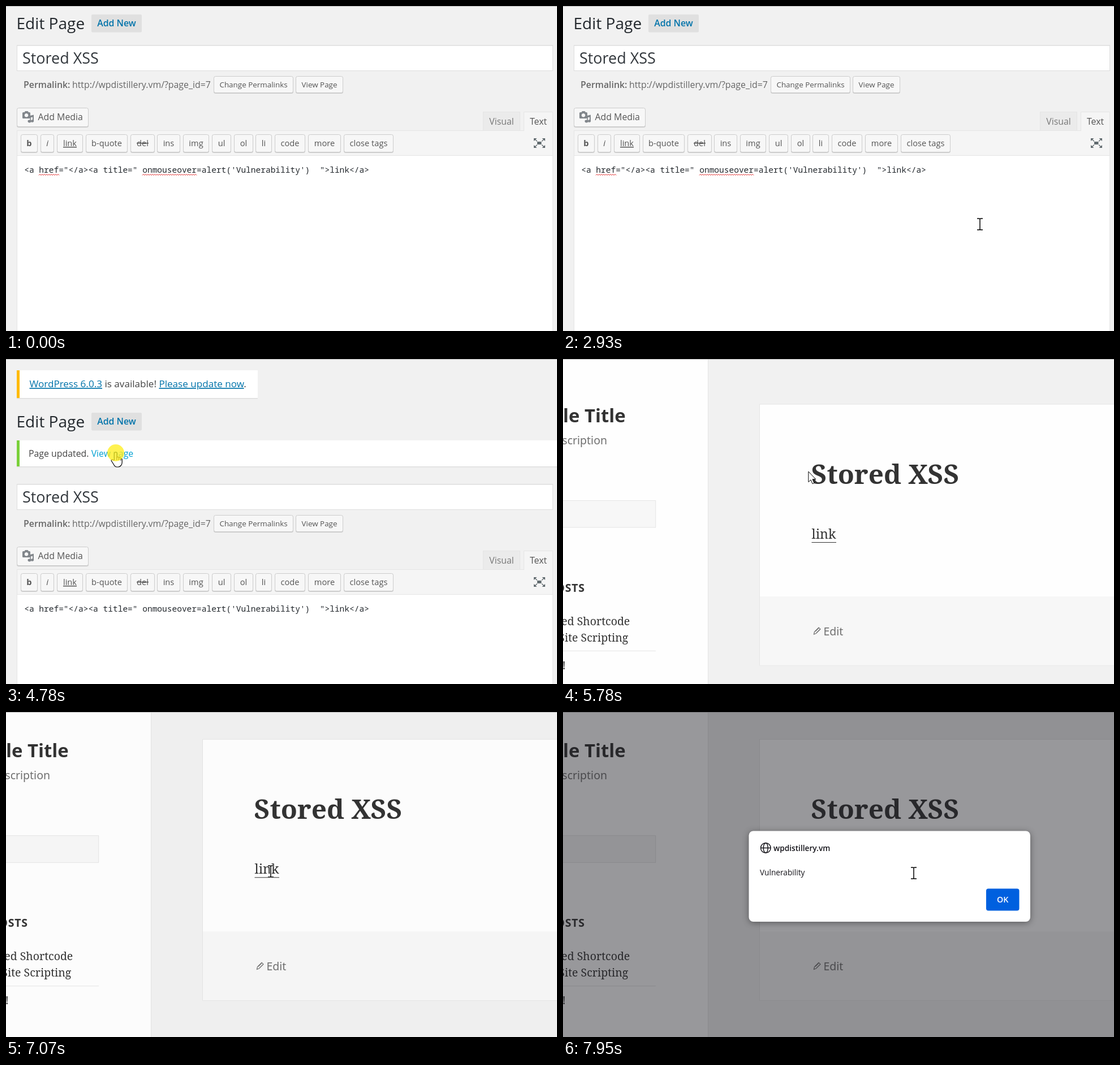
Write an HTML page that moves like this. It is 974x575 px and loops after 8 s.

```html
<!DOCTYPE html>
<html lang="en">
<head>
<meta charset="utf-8">
<title>Stored XSS demo</title>
<style>
html, body { margin: 0; width: 100%; height: 100%; overflow: hidden; background: #f1f1f1; }
svg { display: block; width: 100vw; height: 100vh; }
text { white-space: pre; }
#editor { font: 15.86px "Open Sans", sans-serif; fill: #555; }
#site { font: 19.5px "Noto Serif", serif; fill: #333; }
#dialog { font: 13.7px "Open Sans", sans-serif; fill: #15141a; }
.sans { font-family: "Noto Sans", sans-serif; }
.grey { fill: #707070; }
.bold { font-weight: 700; }
.semi { font-weight: 600; }
.dark { fill: #23282d; }
.blue { fill: #0073aa; }
.under { text-decoration: underline; }
.code { font: 500 14.53px "Noto Sans Mono", monospace; fill: #23282d; }
.small { font-size: 13.42px; }
.tool { font-size: 14.64px; }
.mid { text-anchor: middle; }
.end { text-anchor: end; }
.line { fill: none; stroke: #e5e5e5; }
</style>
</head>
<body>
<svg viewBox="0 0 974 575" preserveAspectRatio="none">
  <rect width="974" height="575" fill="#f1f1f1"/>

  <g id="editor">
    <g id="notices">
      <rect x="19" y="69" width="426" height="1.5" fill="#dedede"/>
      <rect x="19" y="20" width="426" height="49" fill="#fff"/>
      <rect x="19" y="20" width="5" height="49" fill="#ffba00"/>
      <text x="41.5" y="50" font-size="17.08" fill="#444"><tspan class="blue under">WordPress 6.0.3</tspan> is available! <tspan class="blue under">Please update now</tspan>.</text>
      <rect x="19" y="190" width="955" height="1.5" fill="#dedede"/>
      <rect x="19" y="144" width="955" height="46" fill="#fff"/>
      <rect x="19" y="144" width="5" height="46" fill="#7ad03a"/>
      <text x="40" y="173" fill="#444">Page updated. <tspan id="view" class="blue">View page</tspan></text>
      <g id="ring" fill="none" stroke="#5b9dd9">
        <rect x="149.5" y="155.5" width="78" height="25"/>
        <rect x="149" y="155" width="79" height="26" stroke-width="3" opacity=".3"/>
      </g>
    </g>

    <g id="heading">
      <text class="dark" x="18.5" y="41" font-size="28.06">Edit Page</text>
      <rect x="151" y="15" width="89" height="31.5" rx="2" fill="#e0e0e0"/>
      <text class="blue semi mid" x="195.5" y="36">Add New</text>
    </g>

    <g id="form">
      <rect x="19.5" y="69.5" width="947" height="45" fill="#fff" stroke="#ddd"/>
      <path d="M20 70.5H966" stroke="#eee"/>
      <text x="29" y="102" font-size="26.96" fill="#32373c">Stored XSS</text>
      <text class="semi" x="31" y="145" fill="#666">Permalink:</text>
      <text x="117" y="145" fill="#666">http://wpdistillery.vm/?page_id=7</text>

      <rect x="843.5" y="187.5" width="65" height="34" fill="#ebebeb" stroke="#e5e5e5"/>
      <text class="mid" x="876" y="210" fill="#777">Visual</text>
      <rect x="19.5" y="220.5" width="947" height="400" fill="#fff" stroke="#e5e5e5"/>
      <rect x="20" y="221" width="946" height="43" fill="#f5f5f5"/>
      <path class="line" d="M20 264.5H966" stroke="#dedede"/>
      <path d="M915.5 221V187.5h51V221" fill="#f5f5f5" stroke="#e5e5e5"/>
      <text class="mid" x="941" y="210">Text</text>
      <g id="buttons"></g>
      <text x="56.5" y="202">Add Media</text>
      <g fill="#82878c">
        <path fill-rule="evenodd" d="M29 189.5q0-1.5 1.5-1.5h2l1.500-2h4.500l1.500 2h1.500q1.500 0 1.500 1.500v8q0 1.500-1.500 1.500h-11q-1.500 0-1.500-1.500zM36 190a3.300 3.300 0 1 0 .1 0z"/>
        <path d="M42.500 194l6.500-1.500V204h-2v-7.500l-3 .8V205h-1.500z"/>
        <ellipse cx="41.500" cy="204" rx="3" ry="2.400"/>
        <ellipse cx="46.600" cy="203.500" rx="2.600" ry="2.300"/>
      </g>
      <g fill="#606a6e">
        <rect x="939" y="240" width="7.500" height="5" rx="1"/>
        <path d="M933 234h5.500l-5.500 5zM953 234h-5.500l5.500 5zM953 251h-5.500l5.500-5zM933 251h5.500l-5.500-5z"/>
        <path d="M934 235l5 4.500M952 235l-5 4.500M934 250l5-4.500M952 250l-5-4.500" stroke="#606a6e" stroke-width="1.300"/>
      </g>
      <text id="source" class="code" x="32.200" y="295">&lt;a href="&lt;/a&gt;&lt;a title=" onmouseover=alert('Vulnerability')  "&gt;link&lt;/a&gt;</text>
      <path id="waves" fill="none" stroke="#e02020"/>
    </g>
  </g>

  <g id="site">
    <rect width="256" height="575" fill="#fefefe"/>
    <path class="line" d="M256.500 0V575"/>
    <g id="scroll">
      <text class="sans bold end" x="110.800" y="112" font-size="32.900">Sample Title</text>
      <text class="sans grey end" x="78" y="151">Site Description</text>
      <rect x="-40" y="250.500" width="203.700" height="47.500" fill="#f7f7f7" stroke="#e5e5e5"/>
      <text class="sans bold end" x="38.800" y="412" letter-spacing=".78">RECENT POSTS</text>
      <text class="end" x="118.300" y="471">Authenticated Shortcode</text>
      <text class="end" x="115.300" y="500">Cross Site Scripting</text>
      <path class="line" d="M0 516.500H164"/>
      <text class="end" x="5" y="549">Hello world!</text>

      <rect x="347.500" y="80" width="640" height="462" fill="#fefefe" stroke="#e5e5e5"/>
      <rect x="348" y="420" width="640" height="121.500" fill="#f7f7f7"/>
      <text class="bold" x="438.500" y="220.500" font-size="47.600">Stored XSS</text>
      <text x="439.500" y="318" font-size="23.200">link</text>
      <path d="M439.500 324.500H483" stroke="#333"/>
      <text class="sans grey" x="460.500" y="489">Edit</text>
      <path d="M443.500 487l1-4.500 7.500-7.500 3 3-7.500 7.500zM446 482l6-6M448 484.500l6-6" fill="none" stroke="#707070" stroke-width="1.200"/>
    </g>
  </g>

  <path d="M0 .5H974" stroke="#b9b9b9"/>
  <rect id="dim" width="974" height="575" fill="#1c1b22"/>

  <g id="dialog">
    <rect x="328.500" y="210.500" width="497.500" height="160.500" rx="8" fill="#fff" style="filter:drop-shadow(0 2px 6px #0006)"/>
    <g fill="none" stroke="#15141a" stroke-width="1.500">
      <circle cx="358.300" cy="240.500" r="8.800"/>
      <ellipse cx="358.300" cy="240.500" rx="4" ry="8.800"/>
      <path d="M349.500 240.500h17.600"/>
    </g>
    <text class="semi" x="372" y="245.500">wpdistillery.vm</text>
    <text x="348" y="289">Vulnerability</text>
    <rect x="748" y="312.500" width="58.500" height="39" rx="4" fill="#0060df"/>
    <text class="semi mid" x="777.300" y="337.300" font-size="14.300" fill="#fff">OK</text>
  </g>

  <g id="cursor" stroke="#000" fill="#fff" stroke-linejoin="round">
    <path id="arrow" d="M0 0V18.500l4.200-3.800 3 7 3-1.300-3-6.700h5.800z"/>
    <g id="beam" fill="none">
      <path d="M-5-10h4l1 1 1-1h4M0-9V9M-5 10h4l1-1 1 1h4" stroke="#fff" stroke-width="3.200"/>
      <path d="M-5-10h4l1 1 1-1h4M0-9V9M-5 10h4l1-1 1 1h4" stroke-width="1.500"/>
    </g>
    <g id="hand" stroke-width="1.200">
      <path d="M-2.500 14V2a2.200 2.200 0 0 1 4.400 0V9a2 2 0 0 1 3.600.8a2 2 0 0 1 3.400 1a1.900 1.900 0 0 1 2.300 1.800V18c0 4-3 8-7 8H2c-3 0-4.500-2-6-5L-7.800 15c-.8-2 1.700-3 3-1.400z"/>
      <path d="M1.900 9v5M5.500 10v4M8.900 11v3.500" fill="none"/>
    </g>
  </g>
  <circle id="click" cx="194" cy="166" r="15" fill="#ffee20"/>
</svg>

<script>
const LOOP = 8000, FRAME = 70;
const $ = id => document.getElementById(id);
const clamp = v => Math.max(0, Math.min(1, v));
const show = (id, on) => { $(id).style.display = on ? '' : 'none'; };
const shift = (id, x, y) => $(id).setAttribute('transform', `translate(${x} ${y})`);

// Buttons: label, left, right
const button = (label, x0, x1, y, h, cls, base, style = '') =>
  `<rect x="${x0}" y="${y + 1}" width="${x1 - x0}" height="${h}" rx="3.500" fill="#ccc"/>
   <rect x="${x0 + .5}" y="${y + .5}" width="${x1 - x0 - 1}" height="${h - 1}" rx="3" fill="#f7f7f7" stroke="#ccc"/>
   <text class="mid ${cls}" x="${(x0 + x1) / 2}" y="${base}" style="${style}">${label}</text>`;
const tools = [
  ['b', 26, 56, 'font-weight:700'], ['i', 61, 85, 'font-style:italic'],
  ['link', 90, 136, 'text-decoration:underline'], ['b-quote', 141, 215],
  ['del', 220, 263, 'text-decoration:line-through'], ['ins', 267, 308],
  ['img', 313, 359], ['ul', 364, 398], ['ol', 403, 437], ['li', 441, 470],
  ['code', 475, 529], ['more', 534, 592], ['close tags', 597, 685]
];
$('buttons').innerHTML =
  button('Change Permalinks', 367, 508, 124, 30, 'small', 144) +
  button('View Page', 512, 596, 124, 30, 'small', 144) +
  button('', 19, 146, 180, 34, '', 202) +
  tools.map(([s, a, b, style]) => button(s, a, b, 227, 32, 'tool', 248, style)).join('');

const wave = (x0, x1) => `M${x0} 299.500` + 'l2-2 2 2'.repeat(Math.round((x1 - x0) / 4));
$('waves').setAttribute('d', wave(58, 93) + wave(241, 337));

// Cursor moves: start, end, from x, y, to x, y
const moves = [
  [390, 670, 820, 550, 962, 431],
  [940, 1010, 967, 430, 990, 430],
  [2930, 3000, 737, 386, 612, 386],
  [3880, 4510, 382, 293, 194, 165],
  [5710, 5920, 325, 183, 521, 212],
  [6120, 6270, 525, 220, 551, 251],
  [6870, 7070, 535, 260, 468, 282],
  [7740, 7950, 500, 283, 620, 285]
];

function cursorAt(t) {
  const m = moves.filter(m => t >= m[0]).pop();
  if (!m) return null;
  const [t0, t1, x0, y0, x1, y1] = m;
  const n = Math.round((t1 - t0) / FRAME);
  const p = clamp(Math.floor((t - t0) / (t1 - t0) * n + .01) / n);
  const e = 1 - (1 - p) ** 2;
  return { x: x0 + (x1 - x0) * e, y: y0 + (y1 - y0) * e };
}

function shape(t, { x, y }) {
  if (t < 3420) return 'beam';
  if (t < 3880) return 'hand';
  if (t < 5710) {
    if (y > 222 && y < 267) return 'beam';
    return (y > 277 && x > 367) || (y < 180 && x < 227) ? 'hand' : 'arrow';
  }
  return t >= 7000 || (t < 6600 && x > 440 && y < 222) ? 'beam' : 'arrow';
}

function draw(t) {
  const saved = t >= 3420, onSite = t >= 5710;
  show('editor', !onSite);
  show('site', onSite);
  show('notices', saved);
  shift('heading', 0, saved ? 80 : 0);
  shift('form', 0, saved ? 152 : 0);
  show('source', !saved || t >= 4020);
  show('waves', !saved);
  show('ring', t >= 4920);
  shift('scroll', 0, t < 6600 ? 0 : t < 6670 ? -16 : -31.7);

  const c = cursorAt(t), kind = c && shape(t, c);
  show('cursor', c);
  if (c) shift('cursor', c.x, c.y);
  for (const k of ['arrow', 'beam', 'hand']) show(k, k === kind);
  $('view').style.fill = kind === 'hand' && c.y < 180 ? '#00a0d2' : '';

  const since = Math.floor((t - 4780) / FRAME) * FRAME;
  $('click').style.opacity = since < 0 ? 0 : .78 * clamp(1 - since / 270);

  const q = 7070 + Math.floor((t - 7070) / FRAME) * FRAME;
  $('dim').style.opacity = .45 * clamp((q - 7066) / 200);
  $('dialog').style.opacity = clamp((q - 7080) / 200);
}

const start = performance.now();
(function tick() {
  draw((performance.now() - start) % LOOP);
  requestAnimationFrame(tick);
})();
</script>
</body>
</html>
```
